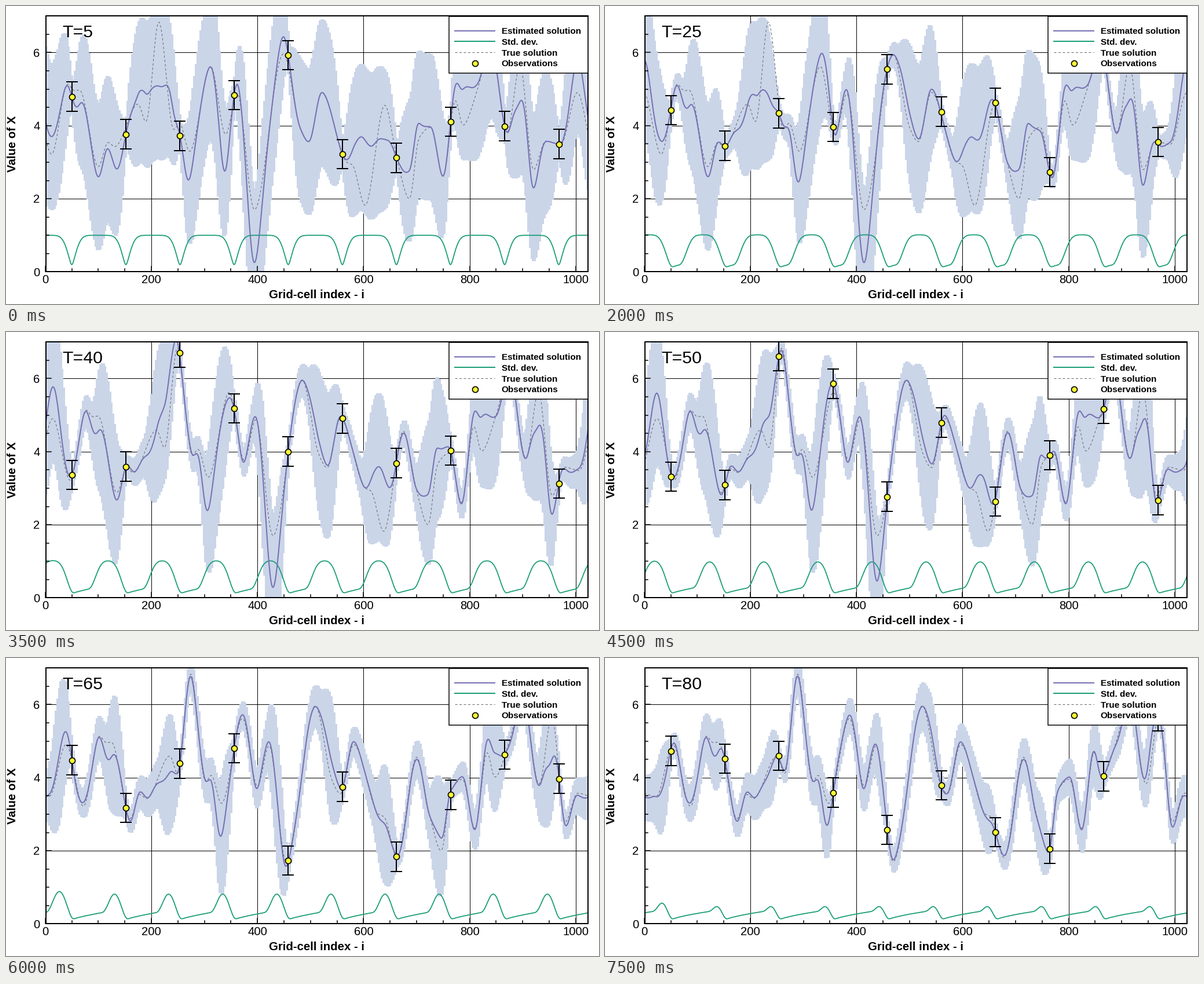
A matplotlib script for the animation above (8000 ms loop, 1024 by 515 pixels).

```python
import numpy as np
import matplotlib.pyplot as plt
from matplotlib.animation import FuncAnimation
from matplotlib.patches import Rectangle

W, H, DPI = 1024, 515, 100
PX = 72 / DPI                       # points per pixel
LEFT, RIGHT, TOP, BOTTOM = 67.8, 1004.9, 17.3, 459.4
N, STEP, FRAMES = 1024, 5, 16
SIGMA, MODEL_VAR, CORR = 0.2, 0.007, 20.7
PURPLE, GREEN, BAND, GREY = "#7570b3", "#1b9e77", "#cad5e8", "#666666"
plt.rcParams["font.family"] = "Liberation Sans"

cells = np.arange(N)
sites = 50 + 102 * np.arange(10)

# Crests and troughs of the true solution at the start
KEYS = [
    (12, 3.2), (42, 5.15), (55, 4.95), (65, 4.98), (100, 2.86), (118, 3.55),
    (131, 3.42), (175, 4.6), (190, 4.08), (214, 6.88), (242, 3.87), (253, 4.08),
    (272, 3.28), (312, 5.64), (340, 3.74), (362, 4.9), (394, 1.68), (449, 5.98),
    (480, 3.95), (497, 3.55), (521, 4.92), (568, 3.0), (579, 2.93), (603, 1.8),
    (640, 4.58), (664, 3.0), (687, 1.98), (704, 3.65), (727, 3.96), (750, 2.58),
    (773, 4.72), (787, 4.0), (815, 5.0), (840, 6.2), (871, 3.8), (895, 5.68),
    (920, 2.77), (943, 3.58), (972, 3.48), (1003, 4.92)]

# First error of the estimate: bumps of centre, height, width
BUMPS = [
    (13, 0.45, 14), (60, -0.45, 12), (101, -0.28, 14), (137, -0.65, 14),
    (190, 0.85, 14), (214, -1.8, 14), (236, 0.75, 10), (267, -0.85, 14),
    (337, -1.05, 12), (361, 0.3, 12), (394, -1.45, 16), (449, 0.47, 14),
    (601, 1.8, 18), (640, -0.95, 14), (690, 0.8, 18), (790, 1.0, 18),
    (893, -1.0, 11), (920, -0.5, 12), (1005, 0.9, 17)]


def curve(pts):
    """Periodic monotone cubic through the points, lightly smoothed."""
    x, y = np.array(pts).T
    x, y = np.concatenate([x - N, x, x + N]), np.tile(y, 3)
    h = np.diff(x)
    s = np.diff(y) / h
    m = np.zeros_like(x)
    m[1:-1] = 2 * np.maximum(s[:-1] * s[1:], 0) / (s[:-1] + s[1:] + 1e-12)
    k = np.searchsorted(x, cells, "right") - 1
    t = (cells - x[k]) / h[k]
    v = (y[k] * (1 + 2 * t) * (1 - t) ** 2 + y[k + 1] * t * t * (3 - 2 * t)
         + h[k] * t * (1 - t) * (m[k] * (1 - t) - m[k + 1] * t))
    lags = np.arange(-6, 7)
    w = np.exp(-lags ** 2 / 8)
    return sum(a * np.roll(v, d) for a, d in zip(w / w.sum(), lags))


def kernel(a, b, length):
    d = np.abs(a[:, None] - b[None, :])
    d = np.minimum(d, N - d)
    return np.exp(-(d / length) ** 2)


def assimilate():
    """Kalman filter on an advected field: one state per frame."""
    rng = np.random.default_rng(4)
    truth = curve(KEYS)
    centre, height, width = np.array(BUMPS).T
    est = truth + kernel(cells, centre, width) @ height
    prior = kernel(cells, cells, CORR)
    cov = prior.copy()
    obs = est[sites]                # the first estimate already fits its data
    states = []
    for k in range(FRAMES):
        if k:
            truth, est = np.roll(truth, STEP), np.roll(est, STEP)
            cov = np.roll(cov, (STEP, STEP), (0, 1)) + MODEL_VAR * prior
            obs = truth[sites] + rng.normal(0, SIGMA / 2, len(sites))
        cross = cov[:, sites]
        noise = SIGMA ** 2 * np.eye(len(sites))
        gain = cross @ np.linalg.inv(cross[sites] + noise)
        cov = cov - gain @ cross.T
        est = est + gain @ (obs - est[sites])
        std = np.sqrt(np.maximum(np.diag(cov), 0))
        states.append((truth, est, std, obs))
    return states


states = assimilate()

fig = plt.figure(figsize=(W / DPI, H / DPI), dpi=DPI, facecolor="white")
ax = fig.add_axes([LEFT / W, 1 - BOTTOM / H, (RIGHT - LEFT) / W, (BOTTOM - TOP) / H])
ax.set(xlim=(0, N - 1), ylim=(0, 7))
ax.axis("off")
page = fig.add_axes([0, 0, 1, 1])
page.set(xlim=(0, W), ylim=(H, 0))
page.axis("off")


def sx(x):
    return LEFT + x * (RIGHT - LEFT) / (N - 1)


def sy(y):
    return BOTTOM - y * (BOTTOM - TOP) / 7


def line(xs, ys, color="black", width=1.0, **kw):
    return page.plot(xs, ys, color=color, lw=width * PX, **kw)[0]


def label(x, y, text, size, **kw):
    return page.text(x, y, text, fontsize=size * PX, va="baseline", **kw)


def segments(xs, lo, hi):
    return np.stack([np.column_stack([xs, lo]), np.column_stack([xs, hi])], axis=1)


# Grid under the data
for x in range(200, N, 200):
    ax.axvline(x, color="black", lw=PX, zorder=0)
for y in (2, 4, 6):
    ax.axhline(y, color="black", lw=PX, zorder=0)

# The band is a row of thick overlapping bars
picks = cells[::3]
band = ax.vlines(picks, 0, 1, color=BAND, lw=7 * PX, antialiased=False, zorder=1)
std_line, = ax.plot([], [], color=GREEN, lw=1.8 * PX, zorder=2)
true_line, = ax.plot([], [], color=GREY, lw=PX, ls=(0, (4, 3.5)), zorder=3)
est_line, = ax.plot([], [], color=PURPLE, lw=2 * PX, zorder=4)
bars = ax.vlines(sites, 0, 1, color="black", lw=2 * PX, zorder=5)
cap_style = dict(ls="", marker="_", color="black", ms=20 * PX, mew=2 * PX, zorder=5)
dot_style = dict(ls="", marker="o", mfc="#ffff33", mec="black", ms=10 * PX, mew=1.7 * PX)
caps, = ax.plot([], [], **cap_style)
dots, = ax.plot([], [], zorder=6, **dot_style)

# Frame, ticks and axis labels
for x in range(0, N, 50):
    line([sx(x)] * 2, [BOTTOM, BOTTOM - (9 if x % 200 == 0 else 5)], width=1.5)
for y in np.arange(0, 7, 0.5):
    line([68.5, 68.5 + (9 if y % 2 == 0 else 5)], [sy(y)] * 2, width=1.5)
page.add_patch(Rectangle((68.5, TOP), 936.5, BOTTOM - TOP, fill=False, lw=2 * PX))
for x in range(0, N, 200):
    label(sx(x), 478.7, str(x), 20.3, ha="center")
for y in (0, 2, 4, 6):
    label(58.5, sy(y) + 7.2, str(y), 20.3, ha="right")
label(537, 505, "Grid-cell index - i", 20.4, ha="center", weight="bold")
label(17.5, 238.5, "Value of X", 20.4, ha="center", weight="bold",
      rotation=90, rotation_mode="anchor")
clock = label(97.5, 54, "", 30.2)
line([0, W], [514.5, 514.5], "#a0a0a0")
line([1023.5, 1023.5], [0, H], "#a0a0a0")

# Legend
page.add_patch(Rectangle((764.5, 18), 240.5, 98.3, fc="white", ec="black",
                         lw=1.5 * PX, zorder=4))
line([775, 844], [43, 43], PURPLE, 2, zorder=5)
line([775, 844], [61, 61], GREEN, 2, zorder=5)
line([775, 844], [80, 80], GREY, 1, ls=(0, (4, 3.5)), zorder=5)
page.plot([809.5], [98.7], zorder=5, **dot_style)
names = ["Estimated solution", "Std. dev.", "True solution", "Observations"]
for i, name in enumerate(names):
    label(855.5, 48.3 + 18.6 * i, name, 15.3, weight="bold", zorder=5)


def update(k):
    truth, est, std, obs = states[k]
    band.set_segments(segments(picks, (est - 2 * std)[picks], (est + 2 * std)[picks]))
    std_line.set_data(cells, std)
    true_line.set_data(cells, truth)
    est_line.set_data(cells, est)
    lo, hi = obs - 2 * SIGMA, obs + 2 * SIGMA
    bars.set_segments(segments(sites, lo, hi))
    caps.set_data(np.tile(sites, 2), np.concatenate([lo, hi]))
    dots.set_data(sites, obs)
    clock.set_text(f"T={STEP * (k + 1)}")
    return band, std_line, true_line, est_line, bars, caps, dots, clock


anim = FuncAnimation(fig, update, frames=FRAMES, interval=500, repeat=True)
plt.show()
```
